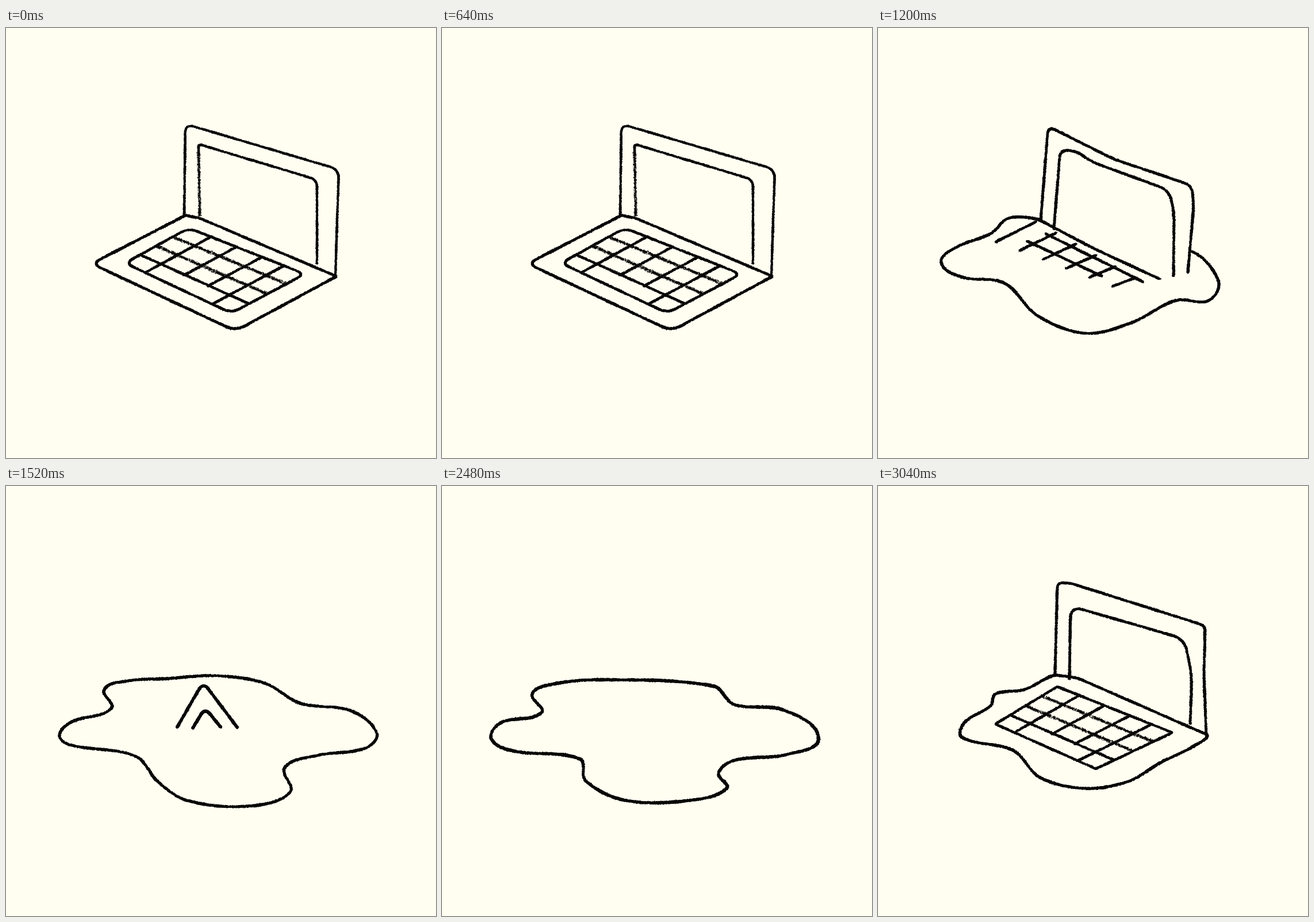
Recreate the animation shown at these times as an HTML page with a canvas. Size 748x748 px, loop 3120 ms.

```html
<!DOCTYPE html>
<html lang="en">
<head>
<meta charset="utf-8">
<title>Melting laptop</title>
<style>
html, body { margin: 0; width: 100%; height: 100%; overflow: hidden; background: #fffef1; }
canvas { display: block; width: 100%; height: 100%; }
</style>
</head>
<body>
<canvas id="stage" width="748" height="748"></canvas>
<script>
const PAPER = '#fffef1', INK = '#0a0908';
const STEP = 80, COUNT = 39;
const MELT = 13, SAG = 15, FLAT = 19, RISE = 32;
const ctx = document.getElementById('stage').getContext('2d');

const mix = (a, b, t) => a + (b - a) * t;
const mixPt = (p, q, t) => [mix(p[0], q[0], t), mix(p[1], q[1], t)];
const dist = (p, q) => Math.hypot(q[0] - p[0], q[1] - p[1]);
const parse = s => s.split(' ').map(p => p.split(',').map(Number));

let seed = 1;
function rnd() {
  seed = (seed * 16807) % 2147483647;
  return seed / 2147483647;
}

// Both path makers return samples about one pixel apart.

// Straight runs with rounded corners.
function bend(pts, r = 0) {
  const out = [];
  let from = pts[0];
  const lineTo = q => {
    const n = Math.ceil(dist(from, q));
    for (let k = 0; k < n; k++) out.push(mixPt(from, q, k / n));
    from = q;
  };
  for (let i = 1; i < pts.length - 1; i++) {
    const p = pts[i], a = dist(p, pts[i - 1]), b = dist(p, pts[i + 1]);
    const d = Math.min(r, a / 2, b / 2);
    const start = mixPt(p, pts[i - 1], d / a), end = mixPt(p, pts[i + 1], d / b);
    lineTo(start);
    for (let t = 0; t < 1; t += 0.6 / (d + 1)) {
      out.push(mixPt(mixPt(start, p, t), mixPt(p, end, t), t));
    }
    from = end;
  }
  lineTo(pts[pts.length - 1]);
  return out;
}

// Closed smooth outline through the points.
function blob(pts) {
  const n = pts.length, out = [];
  const at = i => pts[(i + n) % n];
  const dir = i => {
    const a = at(i - 1), b = at(i + 1), d = dist(a, b);
    return [(b[0] - a[0]) / d, (b[1] - a[1]) / d];
  };
  for (let i = 0; i < n; i++) {
    const a = at(i), b = at(i + 1), len = dist(a, b), u = dir(i), v = dir(i + 1);
    for (let k = 0; k < len; k++) {
      const t = k / len, h = t * t * (3 - 2 * t);
      const m0 = t * (1 - t) * (1 - t) * len, m1 = t * t * (t - 1) * len;
      out.push([0, 1].map(c => mix(a[c], b[c], h) + m0 * u[c] + m1 * v[c]));
    }
  }
  return out;
}

function blend(a, b, t) {
  const n = Math.max(a.length, b.length);
  const pick = (c, i) => c[Math.floor(i / n * c.length)];
  return Array.from({ length: n }, (_, i) => mixPt(pick(a, i), pick(b, i), t));
}

const bent = (s, r) => bend(parse(s), r);
const blobby = s => blob(parse(s));

const laptop = {
  base: bent('312,326 149,410 399,527 575,432', 18),
  hinge: bent('312,326 335,330 575,432', 12),
  screen: bent('310,326 312,167 579,246 573,430', 16),
  side: bent('337,326 335,214'),
  inner: bent('335,214 335,202 541,264 541,411', 13),
  keys: [parse('318,348 520,428 392,496 207,409'), 16]
};
const soft = {
  base: blobby('308,329 255,354 204,362 196,382 150,412 146,437 235,460 282,507 360,526 435,514 490,482 550,452 571,432 440,374 345,333'),
  hinge: bent('308,329 345,333 571,432', 14),
  screen: bent('308,328 312,168 335,169 569,243 567,330 571,432', 10),
  inner: bent('333,335 335,209 533,266 546,330 543,415', 22),
  keys: [parse('312,349 512,429 379,492 204,414'), 3]
};
const sag = {
  base: blobby('280,333 227,331 197,357 135,382 110,408 145,433 220,444 277,500 360,531 440,513 518,474 575,474 592,440 543,388'),
  hinge: bent('281,334 380,386 491,437', 20),
  screen: bent('283,335 296,171 410,228 546,274 549,310 539,426', 14),
  inner: bent('306,350 317,212 345,214 372,233 506,282 515,320 514,432', 18)
};
const tent = {
  base: blobby('280,335 212,339 171,354 183,387 115,410 93,433 110,450 225,470 265,515 315,547 420,557 494,533 485,490 540,469 625,456 645,430 600,391 512,378 450,343 365,330'),
  screen: bent('298,419 343,341 403,421', 16),
  inner: bent('325,421 346,386 374,420', 14)
};
const puddle = blobby('280,337 190,345 157,362 173,394 102,412 86,440 125,461 240,475 250,513 320,547 430,547 495,526 481,499 510,477 600,467 655,438 595,390 508,380 472,348');

// Small redraw wobble; variant 0 leaves the shape alone.
const wobble = (pts, v) => v ? pts.map(([x, y]) =>
  [x + 1.6 * Math.sin(y / 38 + v * 2), y + 1.6 * Math.sin(x / 43 + v * 3)]) : pts;

// Crayon line: solid dabs with a rough edge, or loose grain.
function crayon(line, width = 5, grain = false) {
  const phase = rnd() * 9;
  ctx.fillStyle = INK;
  line.forEach(([x, y], i) => {
    const w = width * (1 + 0.09 * Math.sin(i / 17 + phase) + 0.06 * Math.sin(i / 5.3));
    if (!grain || rnd() < 0.5) {
      ctx.beginPath();
      ctx.arc(x + rnd() - 0.5, y + rnd() - 0.5, w * (grain ? 0.25 : 0.36) + rnd() * 0.6, 0, 7);
      ctx.fill();
    }
    for (let k = grain ? 4 : 2; k--;) {
      const a = rnd() * 6.283, size = 0.7 + rnd() * 0.8;
      const d = w * (grain ? 0.55 * Math.sqrt(rnd()) : mix(0.38, 0.52, rnd()));
      ctx.fillRect(x + d * Math.cos(a) - size / 2, y + d * Math.sin(a) - size / 2, size, size);
    }
  });
}

function mask(line) {
  ctx.fillStyle = PAPER;
  ctx.beginPath();
  line.forEach(p => ctx.lineTo(...p));
  ctx.fill();
}

// Key grid spread over a slanted four-sided field.
function drawKeys([[a, b, c, d], r], v = 0, dx = 0, dy = 0) {
  const at = (s, t) => {
    const [x, y] = mixPt(mixPt(a, b, s), mixPt(d, c, s), t);
    return [x + dx, y + dy];
  };
  const line = (pts, grain) => crayon(wobble(bend(pts, r), v), grain ? 5.6 : 4.7, grain);
  line([at(0, 0.5), at(0, 0), at(1, 0), at(1, 1), at(0, 1), at(0, 0.5)]);
  for (const t of [0.25, 0.51, 0.76]) line([at(0, t), at(1, t)], t < 0.7);
  [0.19, 0.41, 0.63, 0.82].forEach((s, i) => line([at(s, 0), at(s, i % 3 ? 0.78 : 1)]));
}

// Sinking keys: short slanted strokes that shrink to the right.
function drawLooseKeys(dy) {
  for (let i = 0; i < 6; i++) {
    const x = 275 + 34.5 * i, y = 337 + 19.5 * i + dy;
    crayon(bend([[x, y], [x - 70 + 6 * i, y + 35 - 4 * i]]));
  }
  crayon(bend([[292, 358 + dy], [462, 442 + dy]]));
  crayon(bend([[260, 371 + dy], [390, 432 + dy]]));
}

function drawLaptop(v) {
  const line = (pts, w, grain) => crayon(wobble(pts, v), w, grain);
  line(laptop.base, 5.2);
  line(laptop.hinge, 4.8);
  line(laptop.screen, 4.3);
  line(laptop.side, 5, true);
  line(laptop.inner, 4.3);
  drawKeys(laptop.keys, v);
}

function drawMelt(from, to, t) {
  const screen = blend(from.screen, to.screen, t);
  crayon(blend(from.base, to.base, t ** 0.7), 5.4);
  mask(screen);
  crayon(screen);
  crayon(blend(from.inner, to.inner, t));
  if (to.hinge) crayon(blend(from.hinge, to.hinge, t));
}

function drawPuddle(v) {
  const spread = 1 + 0.25 * Math.sin((v - 3) * Math.PI / 2);
  crayon(wobble(blend(tent.base, puddle, spread), 3 - v), 6);
}

function draw(i) {
  if (i >= RISE) i = FLAT + RISE - i; // rises by the poses it melted through
  const v = i === 5 ? 0 : i % 4; // the resting pose is held once
  seed = 4021 + 733 * (i < MELT ? v : i > FLAT ? 40 + v : i);
  ctx.fillStyle = PAPER;
  ctx.fillRect(0, 0, 748, 748);
  if (i < MELT) {
    drawLaptop(v);
  } else if (i < SAG) {
    const late = i - MELT;
    drawMelt(soft, sag, late / 2);
    drawKeys(soft.keys, 0, -13 * late, 3 * late);
  } else if (i <= FLAT) {
    const late = i - SAG;
    drawMelt(late ? sag : soft, late ? tent : sag, late ? (late / 4) ** 1.8 : 1);
    if (late < 2) drawLooseKeys(14 * late);
  } else {
    drawPuddle(v);
  }
}

let shown = -1;
function tick() {
  const i = Math.floor(performance.now() / STEP) % COUNT;
  if (i !== shown) draw(shown = i);
  requestAnimationFrame(tick);
}
tick();
</script>
</body>
</html>
```
